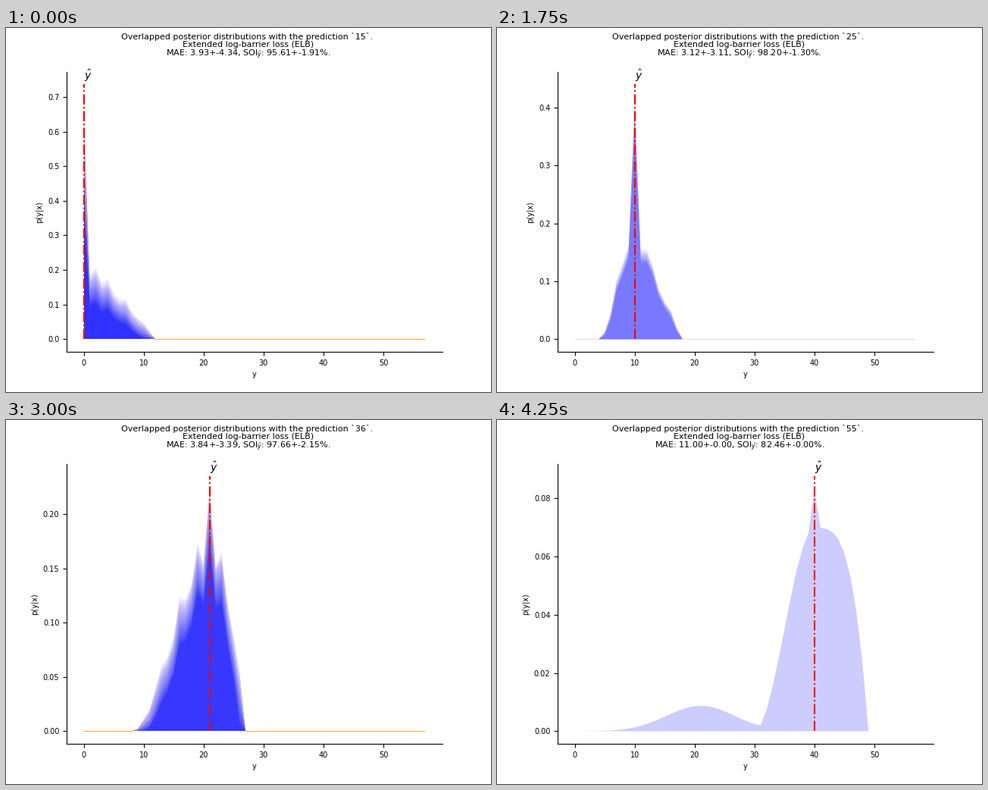
A matplotlib script for the animation above (4500 ms loop, 640x480 px).

```python
import numpy as np
import matplotlib.pyplot as plt
from matplotlib.animation import FuncAnimation
from matplotlib.collections import LineCollection, PolyCollection

plt.rcParams.update({
    "font.family": "DejaVu Sans",
    "axes.spines.top": False, "axes.spines.right": False,
    "axes.labelsize": 7, "xtick.labelsize": 7, "ytick.labelsize": 7,
})

FIRST_LABEL = 15
AGES = np.arange(58)
MODES = (0, 2, 4, 7, 10, 12, 13, 16, 19, 21, 23, 26)  # ages with local maxima


def style(fills, fill_alpha, lines=0, line_alpha=0.0, color="orange",
          core=1.0, shrink=1.0, stretch=1.0, skew=1.0):
    """core/shrink set the inner band's height/width, stretch the haze's width."""
    return dict(fills=fills, fill_alpha=fill_alpha, lines=lines, line_alpha=line_alpha,
                color=color, core=core, shrink=shrink, stretch=stretch, skew=skew)


def sparse(n, core=0.8, shrink=0.9):
    return style(n, 0.004, n, 0.004, core=core, shrink=shrink)


DENSE = style(500, 0.012, 900, 0.12, "#ee9408",
              core=0.53, shrink=0.7, stretch=1.45, skew=3)
FEW = style(40, 0.016, 40, 0.004, core=0.85, shrink=0.95)
SINGLE = style(1, 0.2)

# peak, ymax, left foot, right foot, right-side exponent, MAE, SOI, style, shelf, tail
SCENES = [
    (0, .7362, -1, 12, 1.3, "3.93+-4.34", "95.61+-1.91", sparse(207, .5, .8), .4, 0),
    (2, .5, -1, 10, 1.2, "2.61+-2.85", "97.42+-1.66", sparse(190, .65), .6, 0),
    (4, .4045, 0, 8.4, 1.2, "1.82+-1.97", "99.09+-0.98", DENSE, 1, 0),
    (5, .34, 0, 12, 1, "1.95+-2.12", "98.87+-1.12", sparse(200), 1, 0),
    (7, .46, 1, 14, 1, "2.08+-2.74", "98.73+-1.25", sparse(150), .6, 0),
    (8, .19626, 3, 15.5, 1.5, "2.24+-3.23", "98.66+-1.41", sparse(170, .88, .94), 1.1, 0),
    (9, .26, 3, 17, 1, "2.87+-3.05", "98.31+-1.38", FEW, 1, 0),
    (10, .44, 4, 18, 1, "3.12+-3.11", "98.20+-1.30", FEW, .6, 0),
    (12, .25, 4, 25, 1, "3.78+-3.14", "97.85+-1.36", DENSE, 1, 0),
    (13, .2246, 4.5, 26, 1, "4.42+-3.18", "97.64+-1.35", DENSE, 1, 0),
    (16, .19, 6, 26, 1.5, "4.31+-3.27", "97.32+-1.84", DENSE, 1, 0),
    (19, .1806, 8, 26, 2, "3.99+-3.44", "97.07+-2.41", DENSE, 1, 0),
    (21, .235, 8, 27, 2, "3.84+-3.39", "97.66+-2.15", sparse(200, .75, .85), 1, 0),
    (22, .24, 9, 27, 2, "3.73+-3.46", "98.14+-1.92", sparse(235, .75, .85), 1, 0),
    (23, .24114, 11, 26.4, 2, "3.65+-3.51", "98.52+-1.71", DENSE, 1, 0),
    (24, .27, 11, 28, 2, "4.06+-3.72", "98.05+-1.88", sparse(150, .75, .85), 1, 0),
    (26, .12, 6, 30, 2, "7.00+-0.00", "92.98+-0.00", SINGLE, 1, .06),
    (40, .08744, 30, 49, 3.5, "11.00+-0.00", "82.46+-0.00", SINGLE, 1.2, .1),
]


def hill(peak, left, right, power, width=1.0):
    """Smooth rise to the peak and power-law fall, with feet scaled by width."""
    rise = np.clip(1 + (AGES - peak) / ((peak - left) * width), 0, 1)
    fall = np.clip((AGES - peak) / ((right - peak) * width), 0, 1)
    return rise ** 2 * (3 - 2 * rise) * (1 - fall ** power)


def bands(peak, ymax, left, right, power, kind, shelf, tail):
    ripple = shelf * np.where(np.isin(AGES, MODES), 0.82, 0.7)
    ripple[peak] = 1
    floor = tail * np.exp(-((AGES - 21) / 8) ** 2)
    widths = kind["shrink"], 1, kind["stretch"]
    heights = 0.95 * kind["core"], 0.95, 0.97
    haze_right = peak + (right - peak) * 1.1 / kind["stretch"]
    feet = right, right, haze_right if kind["stretch"] > 1 else right
    return [ymax * np.maximum(h * ripple * hill(peak, left, r, power, w), floor)
            for h, r, w in zip(heights, feet, widths)]


def sample_curves(rng, n, low, high, skew=1.0):
    """Random curves between two bands, from a walk reflected into [0, 1]."""
    walk = rng.random((n, 1)) * 2 + rng.normal(0, 0.1, (n, AGES.size)).cumsum(axis=1)
    mix = (1 - np.abs(walk % 2 - 1)) ** skew
    return low + mix * (high - low)


def points(curves):
    return [np.column_stack([AGES, curve]) for curve in curves]


fig, ax = plt.subplots(figsize=(6.4, 4.8), dpi=100)
title = fig.text(0.5, 0.988, "", ha="center", va="top", fontsize=8, linespacing=1.0)


def draw(i):
    peak, ymax, left, right, power, mae, soi, kind, shelf, tail = SCENES[i]
    low, high, haze = bands(peak, ymax, left, right, power, kind, shelf, tail)
    rng = np.random.default_rng(100 + i)
    ax.clear()

    fills = sample_curves(rng, kind["fills"], low, np.maximum(high, haze), kind["skew"])
    bodies = [np.vstack([(0, 0), p, (AGES[-1], 0)]) for p in points(fills)]
    ax.add_collection(PolyCollection(bodies, facecolors="blue", edgecolors="none",
                                     linewidths=0, alpha=kind["fill_alpha"], zorder=1),
                      autolim=False)
    ax.plot([peak, peak], [0, ymax], "r-.", lw=1.5, zorder=1.5)
    if kind["lines"]:
        strokes = points(sample_curves(rng, kind["lines"], low, high))
        ax.add_collection(LineCollection(strokes, colors=kind["color"], linewidths=0.5,
                                         alpha=kind["line_alpha"], zorder=2),
                          autolim=False)
    ax.text(peak, ymax * 1.02, r"$\hat{y}$", fontsize=10)

    ax.set_xlim(-2.85, 59.85)
    ax.set_ylim(-0.05 * ymax, 1.05 * ymax)
    ax.set_xlabel("y")
    ax.set_ylabel("p(y|x)")
    title.set_text(
        f"Overlapped posterior distributions with the prediction `{peak + FIRST_LABEL}`. \n"
        "Extended log-barrier loss (ELB)\n"
        rf"MAE: {mae}, SOI$_{{\hat{{y}}}}$: {soi}%.")
    return []


anim = FuncAnimation(fig, draw, frames=len(SCENES), interval=250,
                     init_func=lambda: [], repeat=True, repeat_delay=0)
plt.show()
```
